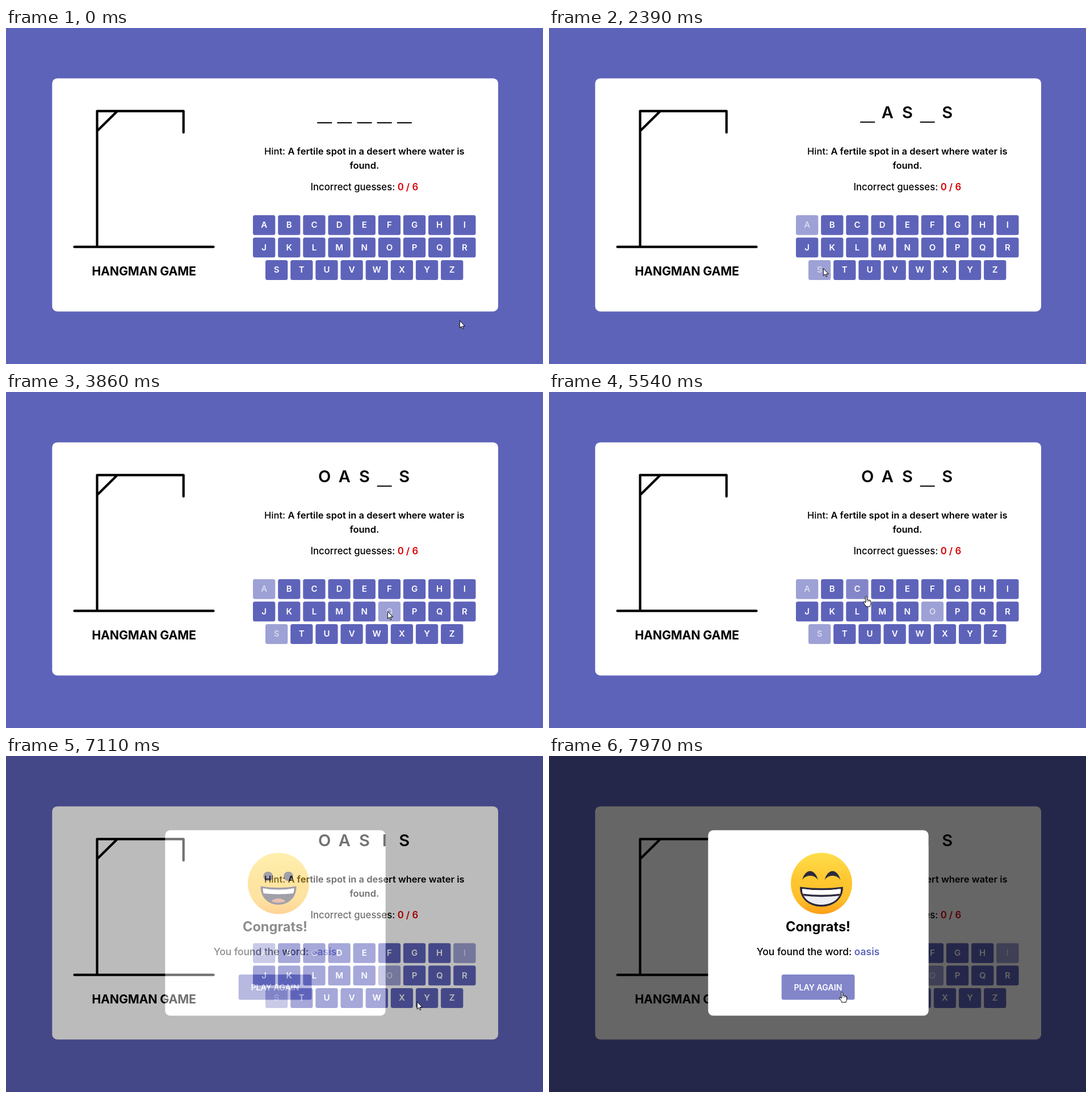
Recreate the animation shown at these times as an HTML page with a canvas. Size 946x592 px, loop 8 s.

```html
<!DOCTYPE html>
<html lang="en">
<head>
<meta charset="utf-8">
<title>Hangman Game</title>
<style>
html, body { margin: 0; width: 100%; height: 100%; overflow: hidden; background: #5e63ba; }
canvas { display: block; }
</style>
</head>
<body>
<canvas id="stage" width="946" height="592"></canvas>
<script>
const W = 946, H = 592, LOOP = 8000;
const PURPLE = '#5e63ba', HOVER = '#8286c9', DARK = '#2d2a3e';
const WORD = 'OASIS';
const CLICKS = { A: 1250, S: 2190, O: 3830, I: 6700 };
const MODAL_AT = 7005, FADE = 400;

// Pointer tip: time, x, y
const PATH = [
  [0, 799, 516], [400, 645, 410], [800, 497, 353], [1020, 462, 350],
  [1300, 462, 350], [1640, 480, 402], [2080, 483, 424], [2390, 483, 424],
  [2700, 600, 366], [2960, 770, 357], [3200, 728, 384], [3600, 672, 387],
  [4280, 672, 387], [4660, 550, 388], [4880, 470, 378], [5040, 461, 351],
  [5260, 461, 351], [5540, 558, 360], [5800, 640, 372], [6070, 694, 385],
  [6300, 735, 370], [6560, 793, 345], [6880, 793, 345], [7170, 705, 444],
  [7690, 590, 441], [7940, 516, 416], [8000, 516, 416]
];

const stage = document.getElementById('stage').getContext('2d');
const layer = document.createElement('canvas');
layer.width = W;
layer.height = H;
const modal = layer.getContext('2d');

const lerp = (a, b, p) => a + (b - a) * p;
const clamp = v => Math.max(0, Math.min(1, v));

// CSS "ease" timing, solved by bisection
function ease(x) {
  const bez = (a, b, u) => 3 * a * u * (1 - u) ** 2 + 3 * b * u * u * (1 - u) + u ** 3;
  let lo = 0, hi = 1;
  for (let i = 0; i < 20; i++) {
    const mid = (lo + hi) / 2;
    if (bez(.25, .25, mid) < x) lo = mid; else hi = mid;
  }
  return bez(.1, 1, lo);
}

// Slope at a waypoint; zero at turns and rests
function slope(i, axis) {
  const a = PATH[i - 1], b = PATH[i], c = PATH[i + 1];
  if (!a || !c) return 0;
  const before = (b[axis] - a[axis]) / (b[0] - a[0]);
  const after = (c[axis] - b[axis]) / (c[0] - b[0]);
  return before * after <= 0 ? 0 : 2 * before * after / (before + after);
}

function pointerAt(t) {
  let i = 0;
  while (i < PATH.length - 2 && t >= PATH[i + 1][0]) i++;
  const a = PATH[i], b = PATH[i + 1], dt = b[0] - a[0], u = (t - a[0]) / dt;
  const axis = k => {
    const h = u * u * (3 - 2 * u);
    return lerp(a[k], b[k], h)
      + dt * (u * (1 - u) ** 2 * slope(i, k) - u * u * (1 - u) * slope(i + 1, k));
  };
  return { x: axis(1), y: axis(2) };
}

const KEYS = [...'ABCDEFGHIJKLMNOPQRSTUVWXYZ'].map((letter, i) => {
  const row = Math.floor(i / 9);
  return {
    letter,
    x: (row === 2 ? 457 : 435) + (i % 9) * 44.15,
    y: 329.7 + row * 39.6,
    w: 39.3,
    h: 35
  };
});
const BUTTON = { x: 409.7, y: 385, w: 128.8, h: 44.5 };

const inside = (p, r) => p.x >= r.x && p.x <= r.x + r.w && p.y >= r.y && p.y <= r.y + r.h;
const guessed = (letter, t) => t >= CLICKS[letter];

function box(c, x, y, w, h, r, color) {
  c.fillStyle = color;
  c.beginPath();
  c.roundRect(x, y, w, h, r);
  c.fill();
}

function setFont(c, weight, size) {
  c.font = `${weight} ${size}px Inter, "Open Sans", sans-serif`;
}

// Centred line made of [text, weight, color] runs
function line(c, x, y, size, ...runs) {
  c.textAlign = 'left';
  const widths = runs.map(([text, weight]) => {
    setFont(c, weight, size);
    return c.measureText(text).width;
  });
  x -= widths.reduce((a, b) => a + b) / 2;
  runs.forEach(([text, weight, color], i) => {
    setFont(c, weight, size);
    c.fillStyle = color;
    c.fillText(text, x, y);
    x += widths[i];
  });
}

function drawGallows(c) {
  c.strokeStyle = '#000';
  c.lineWidth = 4.2;
  c.lineCap = c.lineJoin = 'round';
  c.beginPath();
  c.moveTo(120.5, 385.7); c.lineTo(365.5, 385.7);
  c.moveTo(160.5, 385); c.lineTo(160.5, 146.3);
  c.lineTo(312.7, 146.3); c.lineTo(312.7, 184);
  c.moveTo(161.5, 180.5); c.lineTo(195, 147.5);
  c.stroke();
}

function drawWord(c, t) {
  const lineY = t < CLICKS.A ? 166 : 164.8;
  [...WORD].forEach((letter, i) => {
    const x = 561.2 + i * 35.15;
    if (guessed(letter, t)) line(c, x, 159, 29, [letter, 600, '#000']);
    else {
      c.fillStyle = '#000';
      c.fillRect(x - 13, lineY, 26, 2);
    }
  });
}

function drawKeys(c, t, hover) {
  for (const key of KEYS) {
    c.globalAlpha = guessed(key.letter, t) ? .6 : 1;
    box(c, key.x, key.y, key.w, key.h, 3.5, key === hover ? HOVER : PURPLE);
    line(c, key.x + key.w / 2, key.y + 22.5, 15, [key.letter, 600, '#fff']);
  }
  c.globalAlpha = 1;
}

function drawGame(c, t, hover) {
  c.fillStyle = PURPLE;
  c.fillRect(0, 0, W, H);
  box(c, 81.3, 88.7, 785.7, 410.8, 9, '#fff');
  drawGallows(c);
  c.letterSpacing = '-0.2px';
  line(c, 243, 435.5, 21.4, ['HANGMAN GAME', 700, '#000']);
  c.letterSpacing = '0px';
  drawWord(c, t);
  line(c, 631.3, 223, 16.5, ['Hint: ', 500, '#000'],
    ['A fertile spot in a desert where water is', 600, '#000']);
  line(c, 631.3, 248, 16.5, ['found.', 600, '#000']);
  line(c, 631.3, 286, 16.7, ['Incorrect guesses: ', 500, '#000'], ['0 / 6', 600, '#d60000']);
  drawKeys(c, t, hover);
}

function mouthPath(c, w, top, sag, bottom) {
  c.beginPath();
  c.moveTo(-w, top);
  c.quadraticCurveTo(0, top + sag * 2, w, top);
  const low = top + (bottom - top) * 1.333;
  c.bezierCurveTo(w * 1.02, low, -w * 1.02, low, -w, top);
  c.closePath();
}

// p: 0 = open mouth with round eyes, 1 = toothy grin with arched eyes
function drawFace(c, p) {
  c.save();
  c.translate(480, 224.5);
  const skin = c.createLinearGradient(0, -54, 0, 54);
  skin.addColorStop(0, '#ffde4c');
  skin.addColorStop(.45, '#fec62f');
  skin.addColorStop(.75, '#fec02c');
  skin.addColorStop(1, '#fe9d16');
  c.fillStyle = skin;
  c.beginPath();
  c.arc(0, 0, 54, 0, 7);
  c.fill();

  c.fillStyle = DARK;
  const w = lerp(8.3, 14, p), end = lerp(-12.5, -6, p), k = lerp(1, .6, p) * w;
  const up = end + lerp(-11, -21, p), down = end + lerp(11, -10, p);
  for (const x of [lerp(-18.3, -20, p), lerp(17.5, 19.5, p)]) {
    c.beginPath();
    c.moveTo(x - w, end);
    c.bezierCurveTo(x - k, up, x + k, up, x + w, end);
    c.bezierCurveTo(x + k, down, x - k, down, x - w, end);
    c.fill();
  }

  const half = lerp(31.5, 38, p), top = lerp(5, 6, p), low = lerp(37.5, 41, p);
  mouthPath(c, half, top, 2.5, low);
  c.fill();
  mouthPath(c, half - 4, top + 3.5, 2.5, low - 3.5);
  c.clip();
  c.fillStyle = '#cd7355';
  c.globalAlpha = 1 - p;
  c.beginPath();
  c.ellipse(0, 34, 13, 7.5, 0, 0, 7);
  c.fill();
  c.globalAlpha = p;
  c.fillStyle = '#eeeef5';
  c.fillRect(-40, 0, 80, 45);
  c.globalAlpha = 1;
  c.fillStyle = '#fff';
  const bite = lerp(16, 19, p);
  c.beginPath();
  c.moveTo(-40, 0);
  c.lineTo(40, 0);
  c.lineTo(40, bite);
  c.quadraticCurveTo(0, bite + 6, -40, bite);
  c.fill();
  c.globalAlpha = p;
  c.strokeStyle = DARK;
  c.lineWidth = 3.5;
  c.beginPath();
  c.moveTo(-40, bite);
  c.quadraticCurveTo(0, bite + 6, 40, bite);
  c.stroke();
  c.restore();
}

function drawModal(c, t, hover) {
  c.clearRect(0, 0, W, H);
  c.fillStyle = 'rgba(0,0,0,.6)';
  c.fillRect(0, 0, W, H);
  box(c, 280.3, 130.8, 388.4, 326.8, 9, '#fff');
  drawFace(c, clamp((t - 7300) / 220));
  line(c, 474, 309, 23.6, ['Congrats!', 700, '#000']);
  line(c, 474, 351, 17.4, ['You found the word: ', 500, '#000'], ['oasis', 600, PURPLE]);
  box(c, BUTTON.x, BUTTON.y, BUTTON.w, BUTTON.h, 3.5, hover ? HOVER : PURPLE);
  line(c, 474, 412.5, 14.2, ['PLAY AGAIN', 600, '#fff']);
}

const ARROW = new Path2D('M0 0V12.6L2.9 9.9L4.9 14.4L6.7 13.6L4.8 9.3H8.8Z');
const HAND = new Path2D('M-1.4 1.2Q-1.4 0 0 0T1.4 1.2V6Q3.8 5.2 4.2 6.8Q6.2 6.2 6.6 7.6'
  + 'Q8.4 7.4 8.4 9V12.5Q8.4 14.5 7 16.5V18H-.6V16.8Q-2.4 14.4-4.4 11.2Q-5.2 9-3.4 9.2L-1.4 11Z');

function drawPointer(c, pos, hand) {
  c.save();
  c.translate(pos.x + .3, pos.y);
  c.fillStyle = '#fff';
  c.strokeStyle = '#000';
  c.lineWidth = 1;
  c.lineJoin = 'round';
  const shape = hand ? HAND : ARROW;
  c.fill(shape);
  c.stroke(shape);
  if (hand) {
    c.beginPath();
    for (const x of [1.4, 4.1, 6.5]) {
      c.moveTo(x, 6.5);
      c.lineTo(x, 9.3);
    }
    c.lineWidth = .7;
    c.stroke();
  }
  c.restore();
}

function render(t) {
  const pos = pointerAt(t);
  const open = t >= MODAL_AT;
  const hoverKey = !open && KEYS.find(k => !guessed(k.letter, t) && inside(pos, k));
  const hoverButton = open && inside(pos, BUTTON);
  drawGame(stage, t, hoverKey);
  if (open) {
    drawModal(modal, t, hoverButton);
    stage.globalAlpha = ease(clamp((t - MODAL_AT) / FADE));
    stage.drawImage(layer, 0, 0);
    stage.globalAlpha = 1;
  }
  drawPointer(stage, pos, hoverKey || hoverButton);
}

const start = performance.now();
function tick() {
  render((performance.now() - start) % LOOP);
  requestAnimationFrame(tick);
}
tick();
</script>
</body>
</html>
```
